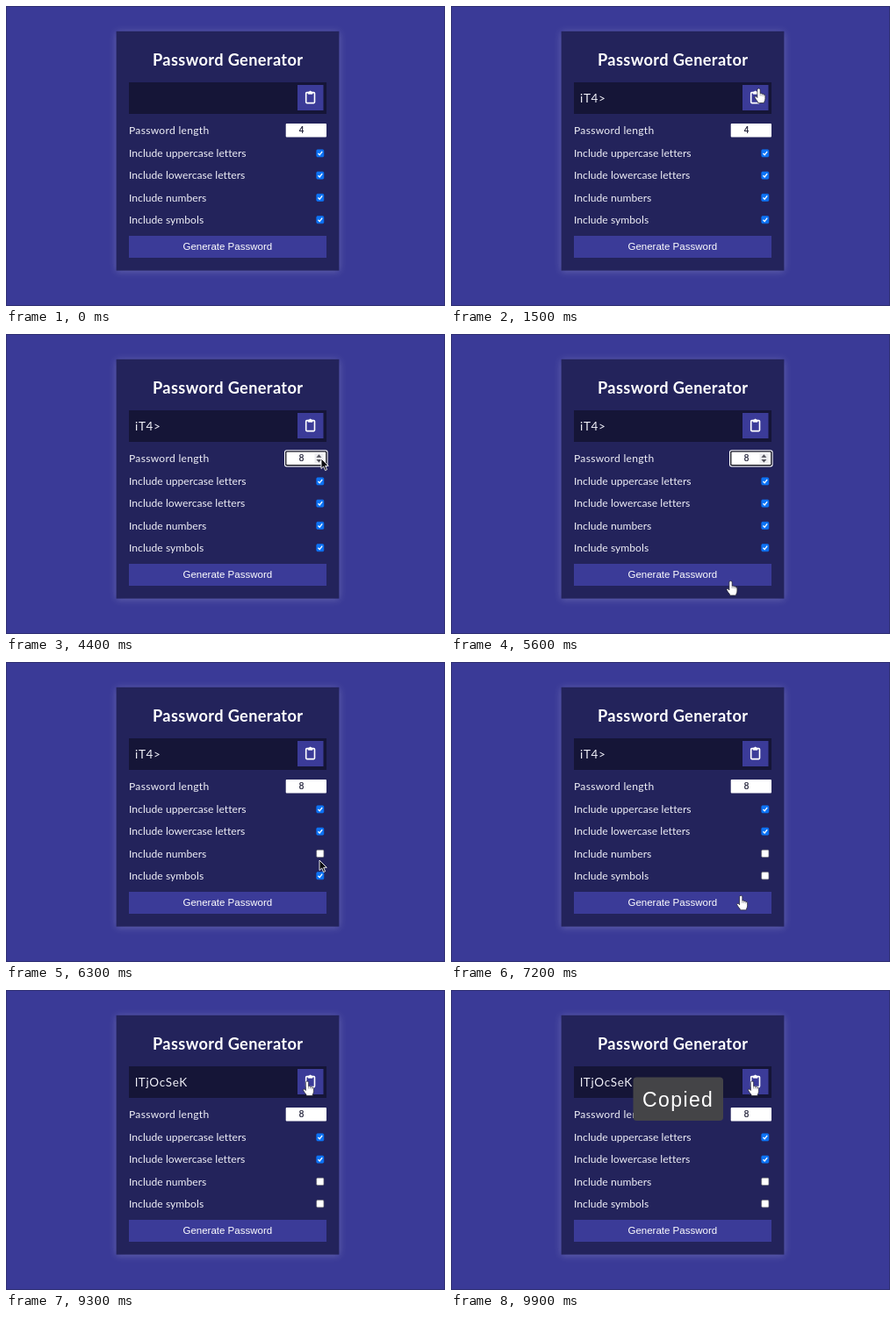
Animation of 500x342 px, one loop 10 s. Source, as an HTML page:

```html
<!DOCTYPE html>
<html lang="en">
<head>
<meta charset="utf-8">
<title>Password Generator</title>
<style>
  html, body { margin: 0; width: 100%; height: 100%; overflow: hidden; background: #3a3a97; }
  svg { display: block; width: 500px; height: 342px; }
  text { font-family: Lato, "Open Sans", sans-serif; font-size: 12.1px; fill: #f0f0f8; }
  .card { fill: #23235b; filter: drop-shadow(0 1px 4px rgba(255, 255, 255, .22)); }
  .title { font-size: 18.2px; font-weight: 700; letter-spacing: .36px; fill: #fff; }
  .mid { text-anchor: middle; }
  .result { font-size: 13.5px; letter-spacing: .7px; }
  .button { fill: #3b3b98; }
  .action, .value, .toast text { font-family: "Liberation Sans", Arial, sans-serif; }
  .action { font-size: 11.5px; fill: #fff; }
  .value { font-size: 10px; fill: #15152e; stroke: #15152e; stroke-width: .2px; }
  .toast text { font-size: 23px; letter-spacing: 1.4px; fill: #fff; }
</style>
</head>
<body>
<svg viewBox="0 0 500 342">
  <rect width="500" height="342" fill="#3a3a97"/>
  <rect x=".5" y=".5" width="499" height="341" fill="none" stroke="#303073"/>

  <rect class="card" x="125.6" y="28.8" width="253.8" height="272.8"/>
  <text class="title mid" x="252.7" y="68">Password Generator</text>

  <rect x="140" y="87" width="225" height="36" fill="#151537"/>
  <text class="result" id="result" x="147" y="109.5"></text>
  <rect class="button" x="332" y="90" width="29.5" height="29"/>
  <g fill="none" stroke="#fff">
    <rect x="341.7" y="98.6" width="9.8" height="12" rx="1" stroke-width="1.6"/>
    <path d="M344.2 100.2V98.2h1.3a1.1 1.1 0 0 1 2.2 0h1.3v2z" fill="#fff" stroke-width=".8"/>
  </g>

  <text x="140" y="146.2" letter-spacing=".28">Password length</text>
  <rect x="318.7" y="134" width="46.3" height="15.6" rx="1" fill="#fff"/>
  <g id="focus" fill="none">
    <rect x="317.6" y="132.8" width="48.4" height="18" rx="2" stroke="#fff" stroke-width="1.2"/>
    <rect x="318.8" y="134" width="46" height="15.6" rx="1" stroke="#101018" stroke-width="1.2"/>
  </g>
  <g id="spinner">
    <rect x="351.5" y="136" width="10" height="11.6" fill="#ededf0"/>
    <path d="M353.4 140.8l3-3.6 3 3.6zM353.4 143l3 3.6 3-3.6z" fill="#50505a"/>
  </g>
  <text class="value mid" id="value" x="336.6" y="145.4"></text>

  <g id="options"></g>

  <rect class="button" x="140" y="262" width="225" height="25"/>
  <text class="action mid" x="252.3" y="278">Generate Password</text>

  <g class="toast" id="toast">
    <rect x="207.5" y="99.5" width="102.5" height="49.5" rx="4" fill="#444447"/>
    <text x="218" y="132.6">Copied</text>
  </g>

  <path id="arrow" fill="#0c0c12" stroke="#fff" stroke-width=".9" stroke-linejoin="round"
    d="M0 0V11.5L2.7 9 4.6 13.5 6.6 12.6 4.7 8.3H8.3Z"/>
  <g id="hand" stroke="#22222c" stroke-width=".7" stroke-linejoin="round">
    <path fill="#fff" d="M-1.6 1Q-1.6-.6 0-.6 1.6-.6 1.6 1V5.2Q3 4.6 3.6 5.8 5.2 5.2 5.6 6.6 7.4 6.2 7.4 8V11Q7.4 13 6.2 14.8V16H-1V14.8Q-3 12.6-4.6 9.6-4.6 8-3 8.6L-1.6 10Z"/>
    <path fill="none" stroke-width=".4" d="M1.6 5.2V8M3.6 6V8.2M5.6 6.8V8.6"/>
  </g>
</svg>
<script>
const LOOP = 10000, STEP = 100;
const $ = id => document.getElementById(id);

// Option label, row centre, time it is switched off
const options = [
  ["Include uppercase letters", 168, Infinity],
  ["Include lowercase letters", 193.2, Infinity],
  ["Include numbers", 218.5, 6200],
  ["Include symbols", 243.8, 6700]
];

// Pointer: time, x, y
const path = [
  [300, 408, 334], [600, 312, 278], [900, 308, 276],
  [1300, 346, 107], [1500, 350.5, 94.5], [2600, 350.5, 94.5],
  [3000, 359, 142], [4800, 359, 142],
  [5200, 348, 212], [5600, 318.5, 282], [5800, 334, 258],
  [6000, 356, 221], [6200, 357, 218], [6500, 357, 242], [6700, 357, 243],
  [7000, 352, 252], [7200, 330.2, 266.8], [7500, 328.7, 270], [8600, 328.7, 270],
  [9000, 340, 128], [9300, 343, 104.5], [LOOP, 343, 104.5]
];

// Value changes: time, new value
const results = [[0, ""], [900, "iT4>"], [7500, "lTjOcSeK"]];
const lengths = [[0, "4"], [3400, "5"], [3600, "6"], [3900, "7"], [4400, "8"]];

const buttons = [[332, 90, 29.5, 29], [140, 262, 225, 25]];
const field = [318, 134, 47, 16];

$("options").innerHTML = options.map(([label, y]) => `
  <text x="140" y="${y + 4.1}" letter-spacing=".03">${label}</text>
  <rect x="353.7" y="${y - 4.2}" width="8.2" height="8.2" rx="1.3" stroke-width=".6"/>
  <path d="M355.5 ${y}l1.7 1.8 3-3.9" fill="none" stroke="#fff" stroke-width="1.3"/>`).join("");
const boxes = $("options").querySelectorAll("rect");
const ticks = $("options").querySelectorAll("path");

const show = (el, on) => el.setAttribute("visibility", on ? "visible" : "hidden");
const between = (t, a, b) => t >= a && t < b;
const inside = ([x, y], [left, top, w, h]) => between(x, left, left + w) && between(y, top, top + h);
const latest = (steps, t) => steps.filter(s => s[0] <= t).pop()[1];

function pointerAt(t) {
  if (t < path[0][0]) return null;
  const i = path.findIndex(p => p[0] > t);
  const [t0, x0, y0] = path[i - 1], [t1, x1, y1] = path[i];
  const k = (t - t0) / (t1 - t0);
  return [x0 + (x1 - x0) * k, y0 + (y1 - y0) * k];
}

function draw(t) {
  $("result").textContent = latest(results, t);
  $("value").textContent = latest(lengths, t);

  options.forEach(([, , off], i) => {
    const on = t < off;
    boxes[i].setAttribute("fill", on ? "#0d73f5" : "#fff");
    boxes[i].setAttribute("stroke", on ? "#0d73f5" : "#777");
    show(ticks[i], on);
  });

  const pos = pointerAt(t);
  const focused = between(t, 3400, 6200);
  const onButton = !!pos && buttons.some(b => inside(pos, b));
  show($("focus"), focused);
  show($("spinner"), focused || (pos && inside(pos, field)));
  show($("toast"), between(t, 2000, 2600) || t >= 9500);
  show($("hand"), onButton);
  show($("arrow"), pos && !onButton);
  if (pos) $(onButton ? "hand" : "arrow").setAttribute("transform", `translate(${pos})`);
}

const start = performance.now();
function frame() {
  const t = (performance.now() - start) % LOOP;
  draw(Math.floor(t / STEP) * STEP);
  requestAnimationFrame(frame);
}
frame();
</script>
</body>
</html>
```
